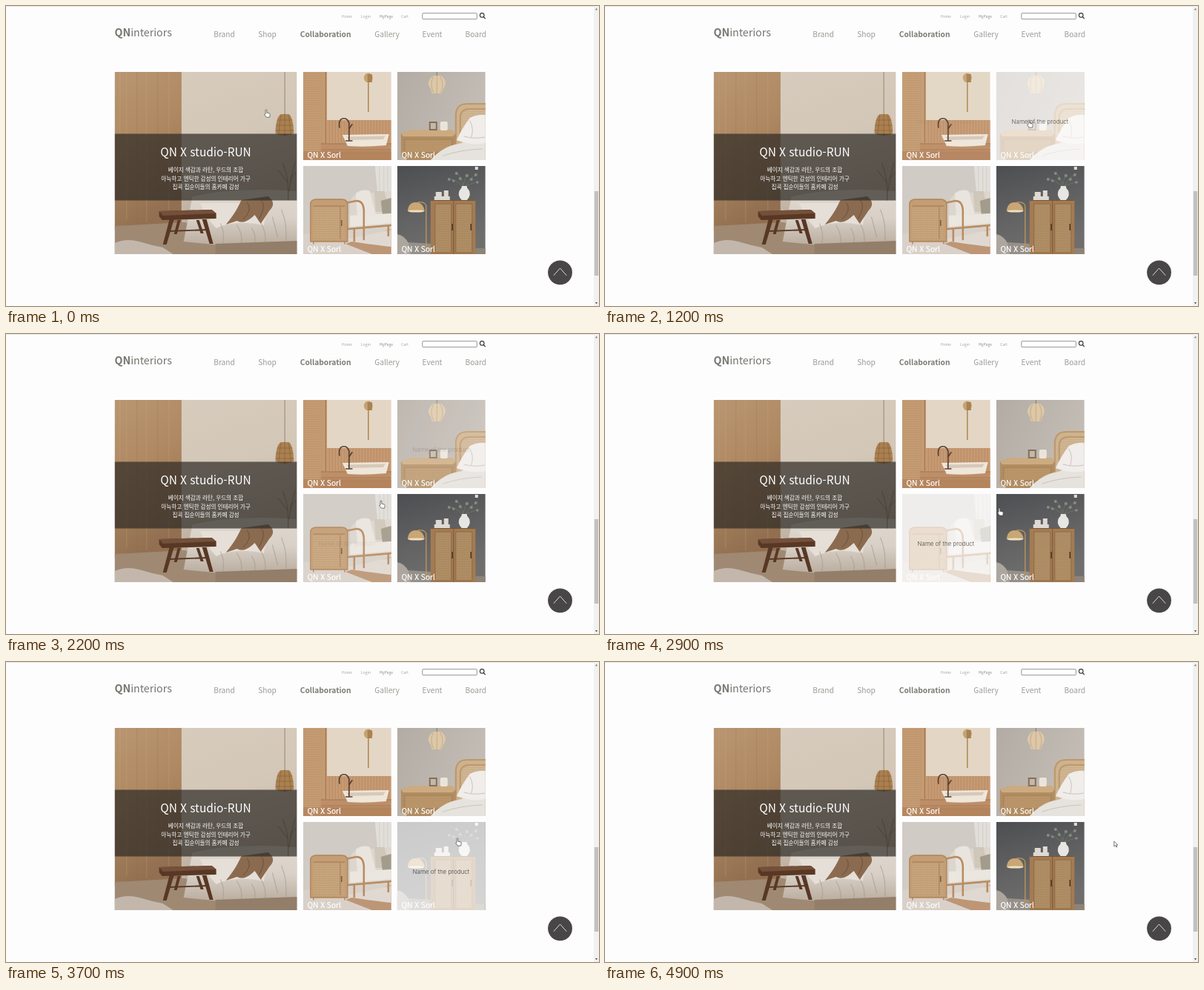
An HTML page for the animation above (5000 ms loop, 800 by 405 pixels).

```html
<!DOCTYPE html>
<html lang="ko">
<head>
<meta charset="utf-8">
<title>Collaboration</title>
<style>
html, body { margin: 0; width: 100%; height: 100%; overflow: hidden; background: #fefdfe; }
#stage { display: block; width: 100vw; height: 100vh; }
text { font-family: "Noto Sans CJK KR", "Noto Sans KR", "Noto Sans", sans-serif; }
.top text { font-size: 5px; fill: #a3a3a3; }
.nav text { font-size: 10.2px; font-weight: 300; fill: #9b9b94; }
.nav .on { font-weight: 700; fill: #7b7b74; }
.mid { text-anchor: middle; fill: #fff; }
.label { font-size: 10.2px; font-weight: 500; fill: #fff; stroke: #fff; stroke-width: .2px; }
.product { font: 300 8px Inter, Lato, sans-serif; text-anchor: middle; fill: #45413e; }
.line { fill: none; stroke-linecap: round; stroke-linejoin: round; }
</style>
</head>
<body>
<svg id="stage" viewBox="0 0 800 405">
  <defs>
    <linearGradient id="wall" x2=".3" y2="1">
      <stop stop-color="#d8ccbe"/><stop offset=".5" stop-color="#d3c7b8"/><stop offset="1" stop-color="#b5a797"/>
    </linearGradient>
    <linearGradient id="panel" x2=".3" y2="1">
      <stop stop-color="#b99672"/><stop offset=".5" stop-color="#ae8861"/><stop offset="1" stop-color="#916f50"/>
    </linearGradient>
    <linearGradient id="sheet" x2="0" y2="1">
      <stop stop-color="#dfd8cf"/><stop offset=".5" stop-color="#d9d1c8"/><stop offset="1" stop-color="#b9ac9e"/>
    </linearGradient>
    <linearGradient id="grey" x2="1" y2=".4">
      <stop stop-color="#b3aca4"/><stop offset="1" stop-color="#c4bdb5"/>
    </linearGradient>
    <linearGradient id="dark" x2=".3" y2="1">
      <stop stop-color="#4d4e51"/><stop offset=".6" stop-color="#636364"/><stop offset="1" stop-color="#706e6d"/>
    </linearGradient>
    <pattern id="cane" width="3" height="3" patternUnits="userSpaceOnUse">
      <path d="M0 0L3 3M3 0L0 3M0 1.5H3" stroke="#8d6237" stroke-width=".4" opacity=".4"/>
    </pattern>
    <pattern id="slat" width="4" height="9" patternUnits="userSpaceOnUse">
      <path d="M.5 0V9" stroke="#8a5c38" stroke-width=".6" opacity=".4"/>
    </pattern>
  </defs>

  <rect width="800" height="405" fill="#fefdfe"/>
  <path d="M0 .5H793" stroke="#e4e3e5"/>

  <g class="top">
    <text x="453" y="16">Home</text><text x="479" y="16">Login</text>
    <text x="504" y="16" style="fill:#888">MyPage</text><text x="533" y="16">Cart</text>
  </g>
  <rect x="561.8" y="9.7" width="73.5" height="8" rx="1" fill="#fff" stroke="#7a7a7a" stroke-width=".8"/>
  <g class="line" stroke="#333" stroke-width="1.1"><circle cx="642.2" cy="12.4" r="2.8"/><path d="M644.3 14.5L646.5 16.8"/></g>

  <text x="146.6" y="40.5" font-size="14.2" fill="#75756f"><tspan font-weight="700">QN</tspan>interiors</text>
  <g class="nav">
    <text x="280.2" y="42">Brand</text><text x="340.2" y="42">Shop</text>
    <text x="396.8" y="42" class="on">Collaboration</text><text x="497.2" y="42">Gallery</text>
    <text x="561.6" y="42">Event</text><text x="619.5" y="42">Board</text>
  </g>

  <!-- bedroom -->
  <svg x="146.6" y="89" width="245.9" height="246" viewBox="147 89 245.9 246">
    <rect x="147" y="89" width="246" height="246" fill="url(#wall)"/>
    <rect x="147" y="89" width="90" height="214" fill="url(#panel)"/>
    <path d="M177 89V299M205 89V299M236.6 89V299" stroke="#8d6c49" stroke-width=".6" opacity=".4"/>
    <path d="M154 89V172M163 89V290M190 89V292M220 89V280" stroke="#d0b088" stroke-width="1.5" opacity=".2"/>
    <path d="M147 297L240 292L393 318V335H147Z" fill="#9f8973"/>
    <path d="M147 320Q163 313 180 318T212 326L226 335H147Z" fill="#c3b7ac"/>
    <path d="M252 257Q310 244 393 250V320L300 324L240 318Z" fill="url(#sheet)"/>
    <path d="M262 266H330L352 280L348 296Q310 288 284 300L272 286Z" fill="#e6dfd7"/>
    <path class="line" d="M290 294Q296 308 293 320M312 296Q320 308 318 321M345 294Q352 308 350 319M372 275Q380 294 378 316M332 300Q338 310 336 320M360 285L367 312" stroke="#a3978a" stroke-width="1.3" opacity=".55"/>
    <path d="M283 321L393 317V335H283Z" fill="#937e6a"/>
    <path d="M318 262L354 257Q366 266 356 276L344 294L336 282Q322 296 312 290L297 295Q308 282 314 270Z" fill="#8b6b50"/>
    <path class="line" d="M326 265Q334 276 320 288M345 262Q352 270 342 287" stroke="#6d4e38" stroke-width="1"/>
    <path class="line" d="M381 262Q383 235 374 212M382 250Q386 228 390 211M380 238L368 222M384 234L391 225" stroke="#8a7b66" stroke-width="1"/>
    <path d="M376.5 89V147" stroke="#7d6d5b" stroke-width=".7"/>
    <path d="M371 146H382Q388 150 388.5 172Q376 178 364 172Q364 151 371 146Z" fill="#ab8050"/>
    <path class="line" d="M367 154H386M365 161H388M364 168H388M371 148L368 174M376.5 146V175M382 148L385 174" stroke="#7a5530" stroke-width=".5"/>
    <g fill="#583825">
      <path d="M207 277L278 275L284 280V287L211 289L207 284Z"/>
      <path d="M221 288H227L217 322H212ZM265 288H271L280 321H275ZM232 289H236L231 308H227ZM257 289H261L267 307H263Z"/>
      <path d="M220 303L273 301V303L219 305Z"/>
    </g>
    <path d="M207 277L278 275L284 280L212 283Z" fill="#74503a"/>
    <rect x="147" y="172.5" width="246" height="90" fill="#2d2a25" opacity=".7"/>
  </svg>
  <g class="mid">
    <text x="269.5" y="202.5" font-size="15.4">QN X studio-RUN</text>
    <g font-size="7.6">
      <text x="269.5" y="224">베이지 색감과 라탄, 우드의 조합</text>
      <text x="269.5" y="235.6">아늑하고 엔틱한 감성의 인테리어 가구</text>
      <text x="269.5" y="247.2">집콕 집순이들의 홈카페 감성</text>
    </g>
  </g>

  <!-- basin -->
  <svg class="tile" x="400.8" y="89" width="119" height="119" viewBox="401 89 119 119">
    <rect x="401" y="89" width="119" height="119" fill="#e3d6c5"/>
    <rect x="401" y="89" width="32" height="119" fill="#caa27a"/>
    <rect x="401" y="89" width="28" height="119" fill="url(#cane)"/>
    <path d="M431.5 89V208" stroke="#b0845d" stroke-width="2.5"/>
    <rect x="433" y="154" width="87" height="36" fill="#c69a73"/>
    <rect x="433" y="154" width="87" height="30" fill="url(#slat)"/>
    <path d="M425 185H520V208H425Z" fill="#bd8e67"/>
    <path d="M425 186H520M425 194H520" stroke="#9b704b" stroke-width=".7"/>
    <rect x="401" y="196" width="119" height="12" fill="#b07e58" opacity=".6"/>
    <path d="M454 174L517 173L513 188Q487 191 461 189Z" fill="#efe6da"/>
    <path d="M459 176.5L512 175.5L509 180L463 181Z" fill="#d6c9b9"/>
    <path class="line" d="M463 181V158Q460 149 452 153Q449 156 450 164M463 166L467 160M459 182H467" stroke="#5a4132" stroke-width="1.7"/>
    <path d="M489 98V143" stroke="#b18b55" stroke-width="1.6"/>
    <ellipse cx="489" cy="97" rx="6" ry="6.5" fill="#c5a271"/>
    <path d="M488 92H494V103H488Z" fill="#a98250"/>
  </svg>

  <!-- bedside -->
  <svg class="tile" x="527.8" y="89" width="119" height="119" viewBox="528 89 119 119">
    <rect x="528" y="89" width="119" height="119" fill="url(#grey)"/>
    <path d="M581.5 89V95" stroke="#8d7c66"/>
    <path d="M577 94H587Q594 99 593 106Q590 112 588 118H575Q574 112 570 106Q570 98 577 94Z" fill="#dcc8a8"/>
    <path class="line" d="M577 95Q571 105 577 117M581.5 94V118M586 95Q592 105 587 117" stroke="#b9986c" stroke-width=".6"/>
    <path d="M607 208V146Q608 132 623 132H647V208Z" fill="#d3ba97"/>
    <path d="M607 208V146Q608 132 623 132H647V208Z" fill="url(#cane)" opacity=".6"/>
    <path class="line" d="M607 190V146Q608 132 623 132H648M613 180V150Q614 139 625 139H648" stroke="#bf986b" stroke-width="2.2"/>
    <path d="M533 172L548 167H601L607 172V203L590 208H540L533 203Z" fill="#b18d63"/>
    <path d="M533 172L548 167H601L607 172L603 176H536Z" fill="#cdab80"/>
    <path d="M538 180H602V198H538Z" fill="#bf9c70"/>
    <path d="M538 180H602V198H538Z" fill="url(#cane)" stroke="#a07950" stroke-width=".8"/>
    <rect x="571" y="156" width="11" height="12" fill="#80705e"/><rect x="573" y="158" width="7" height="8" fill="#c6b8a5"/>
    <rect x="586" y="156" width="10" height="12" rx="2" fill="#ebe4db"/>
    <path d="M573 208Q590 189 611 186L647 174V208Z" fill="#e6e2dd"/>
    <path d="M608 181Q616 164 626 151Q637 146 647 147V185Q629 189 608 181Z" fill="#f0edea"/>
    <path class="line" d="M618 176Q632 180 646 177M590 202Q614 194 642 193M626 155Q632 165 628 177" stroke="#c9c3bc"/>
  </svg>

  <!-- sofa -->
  <svg class="tile" x="400.8" y="216" width="119" height="119" viewBox="401 216 119 119">
    <rect x="401" y="216" width="119" height="119" fill="#d0cbc4"/>
    <path d="M498 216H520V260H502Z" fill="#e2deda"/>
    <path d="M504 216V252M510 216V252M515 216V252" stroke="#d2cdc7"/>
    <path d="M401 308L520 298V335H401Z" fill="#d9d1c9"/>
    <path d="M458 321L520 301V335H494Z" fill="#bd9676"/>
    <path d="M455 316L520 302V325Q490 322 455 316Z" fill="#e0d9d1"/>
    <path d="M464 265Q468 252 480 253L520 250V298L464 302Z" fill="#dcd6cd"/>
    <path d="M472 253Q482 246 491 250L499 281L474 283Z" fill="#e9e5de"/>
    <path d="M497 250H511L516 278H499Z" fill="#cfc7ba"/><path d="M506 263L520 259V280L508 281Z" fill="#a39c8c"/>
    <path d="M464 283L520 280V293L464 298Z" fill="#ebe6df"/>
    <path class="line" d="M458 266L473 263Q482 263 483 275V315M462 301L520 296M470 302V317M516 297V310" stroke="#b98c62" stroke-width="2.6"/>
    <path d="M411 318V268Q411 261 419 261H453Q461 261 461 268V318Z" fill="#c49d74"/>
    <path d="M415 315V271H457V315Z" fill="#cdac84"/>
    <path d="M415 315V271H457V315Z" fill="url(#cane)"/>
    <path class="line" d="M411 318V268Q411 261 419 261H453Q461 261 461 268V318ZM415 270H457M451 272V314M415 318V321M457 318V321" stroke="#b0855a" stroke-width="1.4"/>
    <path d="M453 289V297" stroke="#6b4d33" stroke-width="1.3"/>
  </svg>

  <!-- cabinet -->
  <svg class="tile" x="527.8" y="216" width="119" height="119" viewBox="528 216 119 119">
    <rect x="528" y="216" width="119" height="119" fill="url(#dark)"/>
    <rect x="633" y="217" width="4" height="4" fill="#dedede"/>
    <path d="M528 318L574 321V335H528Z" fill="#96908a"/>
    <path d="M528 308Q538 310 543 320L546 335H528Z" fill="#ada69f"/>
    <path d="M633 327H647V335H633Z" fill="#8d8377"/>
    <path class="line" d="M567 326V270Q566 264 556 265M561 327H571" stroke="#b8945c" stroke-width="1.4"/>
    <path d="M542 277Q543 265 553 265Q563 265 565 277Z" fill="#c9a673"/><ellipse cx="553.5" cy="277" rx="11" ry="1.6" fill="#efe0c0"/>
    <path class="line" d="M618 246Q612 236 597 233M618 245Q616 232 607 224M619 245Q625 232 636 226M619 244Q629 238 638 238M617 243Q620 232 622 227" stroke="#6f776a" stroke-width=".8"/>
    <g fill="#858d7e">
      <circle cx="598" cy="234" r="1.9"/><circle cx="604" cy="236" r="1.8"/><circle cx="608" cy="226" r="2"/><circle cx="613" cy="233" r="2"/>
      <circle cx="622" cy="229" r="2.1"/><circle cx="628" cy="234" r="2"/><circle cx="634" cy="228" r="2"/><circle cx="636" cy="238" r="1.8"/>
    </g>
    <path d="M615 243H622Q621.5 246 625 249Q628 256 622 262H615Q609 256 612 249Q615.5 246 615 243Z" fill="#e8e6e2"/>
    <path d="M578 257H599V262H578ZM580 251H588V257H580ZM591 249H597V257H591Z" fill="#dedad3"/>
    <rect x="573" y="262" width="60.5" height="73" fill="#a47b52"/>
    <rect x="579" y="267" width="22" height="66" fill="#b3936a"/><rect x="607" y="267" width="22" height="66" fill="#b3936a"/>
    <path d="M579 267H601V333H579ZM607 267H629V333H607Z" fill="url(#cane)" stroke="#855f3b" stroke-width=".7"/>
    <path d="M604 263V335M573 262.5H633.5" stroke="#775537" stroke-width="1"/>
    <path d="M602.3 294V303M627.5 294V303" stroke="#49301c" stroke-width="1.5"/>
  </svg>

  <circle cx="747.5" cy="359.8" r="16.4" fill="#484647"/>
  <path class="line" d="M739 363.5L747.5 354L756 363.5" stroke="#fff" stroke-width=".8"/>

  <rect x="793" width="7" height="405" fill="#f1f1f1"/>
  <rect x="793.8" y="250" width="5.4" height="114" fill="#c1c1c1"/>
  <path d="M794.8 5.2L796.5 3L798.2 5.2Z" fill="#777"/><path d="M794.8 400L796.5 402.2L798.2 400Z" fill="#555"/>

  <g id="cursor" fill="#fff" stroke="#444" stroke-width=".7" stroke-linejoin="round">
    <path id="hand" transform="translate(-2.4 .6)" d="M1.5 6V1.2A.9.9 0 0 1 3.3 1.2V4.6L6.7 5.4Q7.7 5.7 7.6 6.8L7.1 10.5H2.8L.2 7.2Q-.1 6.2 1.5 6Z"/>
    <path id="arrow" d="M0 0V7L1.7 5.5L2.9 8L4 7.5L2.8 5H5Z"/>
  </g>
</svg>
<script>
const LOOP = 5000, STEP = 100, FADE = 500, WASH = 0.7;
const $ = id => document.getElementById(id);

// time, x, y of the pointer tip
const path = [
  [0, 351, 139], [200, 404, 141], [500, 455, 143], [700, 470, 147], [800, 505, 150],
  [900, 534, 152], [1200, 572, 153], [1800, 571, 160], [1900, 548, 184], [2000, 526, 206],
  [2100, 514, 217], [2200, 506, 224], [2500, 484, 240], [2800, 510, 238], [2900, 532, 234],
  [3300, 590, 239], [3700, 609, 237], [4000, 618, 238], [4200, 652, 241], [4500, 686, 242],
  [5000, 687, 242]
];
// pointer enters and leaves each small tile
const hovers = [[200, 830], [900, 1960], [2150, 2860], [2890, 4130]];
const boxes = [[147, 89, 246], [401, 89, 119], [528, 89, 119], [401, 216, 119], [528, 216, 119]];

function add(parent, tag, attrs, content = "") {
  const el = document.createElementNS("http://www.w3.org/2000/svg", tag);
  for (const key in attrs) el.setAttribute(key, attrs[key]);
  el.textContent = content;
  return parent.appendChild(el);
}

const washes = [...document.querySelectorAll(".tile")].map((tile, i) => {
  const [x, y, size] = boxes[i + 1];
  const group = add(tile, "g", { opacity: 0 });
  add(group, "rect", { x, y, width: size, height: size, fill: "#fff", opacity: WASH });
  add(group, "text", { x: x + 59, y: y + 70, class: "product" }, "Name of the product");
  add(tile, "text", { x: x + 5.6, y: y + 116, class: "label" }, "QN X Sorl");
  return group;
});

// the CSS "ease" curve
function ease(p) {
  if (p <= 0) return 0;
  if (p >= 1) return 1;
  const bez = (a, b, s) => 3 * a * s * (1 - s) ** 2 + 3 * b * s * s * (1 - s) + s ** 3;
  let lo = 0, hi = 1;
  for (let i = 0; i < 20; i++) {
    const mid = (lo + hi) / 2;
    if (bez(0.25, 0.25, mid) < p) lo = mid; else hi = mid;
  }
  return bez(0.1, 1, lo);
}

function pointer(t) {
  const i = path.findIndex(key => key[0] > t);
  const [a, b] = [path[i - 1], path[i]];
  const p = (t - a[0]) / (b[0] - a[0]);
  return [a[1] + (b[1] - a[1]) * p, a[2] + (b[2] - a[2]) * p];
}

function draw(t) {
  washes.forEach((wash, i) => {
    const [enter, leave] = hovers[i];
    wash.setAttribute("opacity", ease((t - enter) / FADE) * (1 - ease((t - leave) / FADE)));
  });
  const [x, y] = pointer(t);
  const over = boxes.some(([bx, by, s]) => x >= bx && x <= bx + s && y >= by && y <= by + s);
  $("cursor").setAttribute("transform", `translate(${x} ${y})`);
  $("hand").setAttribute("visibility", over ? "visible" : "hidden");
  $("arrow").setAttribute("visibility", over ? "hidden" : "visible");
}

const start = performance.now();
function tick() {
  const t = (performance.now() - start) % LOOP;
  draw(Math.floor(t / STEP) * STEP);
  requestAnimationFrame(tick);
}
tick();
</script>
</body>
</html>
```
